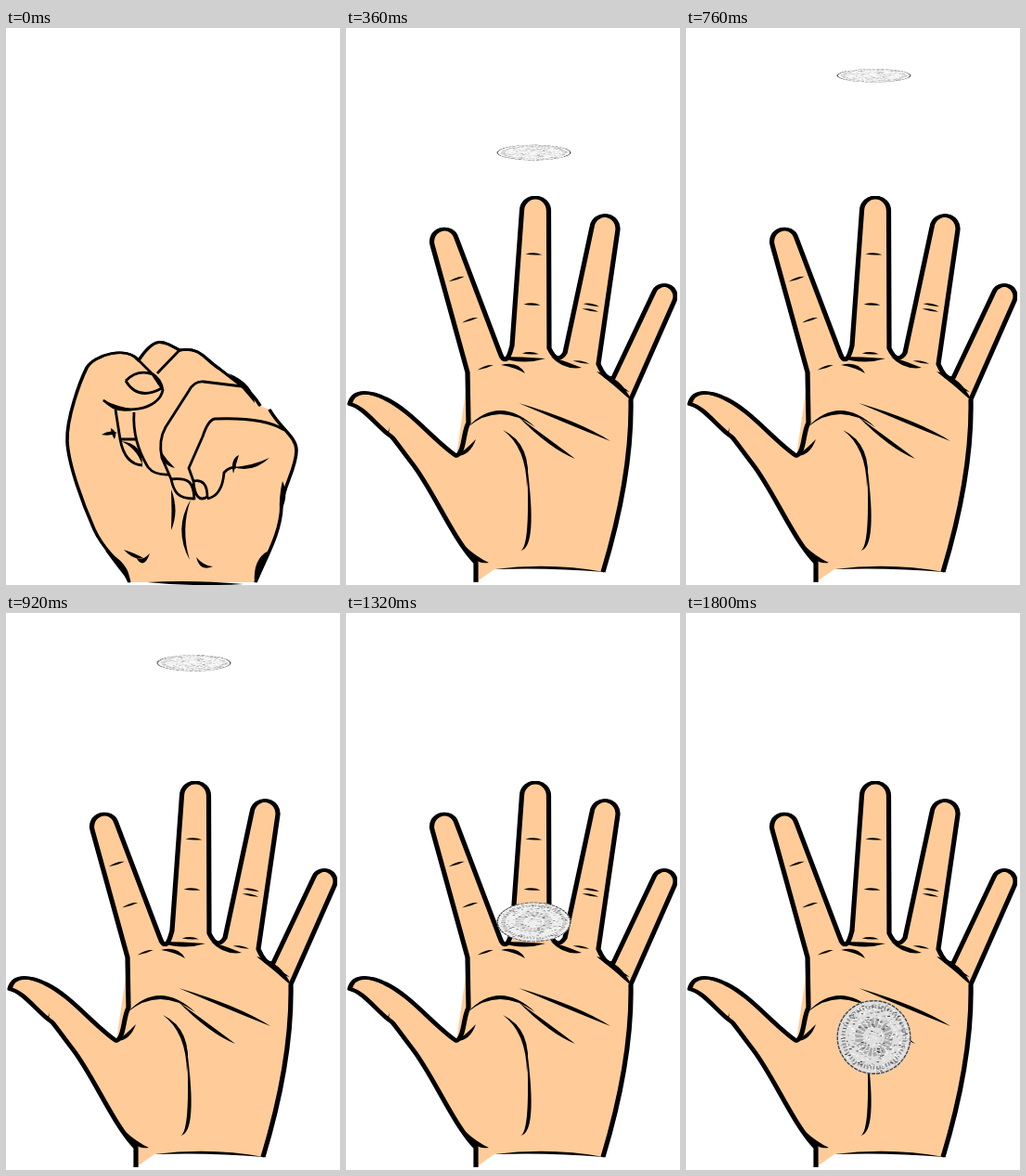
These frames come from a looping animation (360x600 px, 1.84 s). An HTML page with a canvas:

```html
<!DOCTYPE html>
<html lang="en">
<head>
<meta charset="utf-8">
<title>Coin toss</title>
<style>
  html, body { margin: 0; width: 100%; height: 100%; overflow: hidden; background: #fff; }
  canvas { display: block; }
</style>
</head>
<body>
<canvas id="stage" width="360" height="600"></canvas>
<script>
const ctx = document.getElementById('stage').getContext('2d');
const LOOP = 1840, STEP = 40, TAU = 2 * Math.PI;

// Tapered pen line: a quadratic curve that is widest in the middle.
function taper(x1, y1, cx, cy, x2, y2, width = 4) {
  const length = Math.hypot(x2 - x1, y2 - y1);
  const nx = (y1 - y2) / length * width, ny = (x2 - x1) / length * width;
  return new Path2D(`M${x1},${y1}Q${cx + nx},${cy + ny} ${x2},${y2}Q${cx - nx},${cy - ny} ${x1},${y1}`);
}

// A finger runs from its two base corners to a round tip.
const finger = (left, right, tip, radius, joints) => ({ left, right, tip, radius, joints });
const fingers = [
  finger([131, 371], [166, 350], [106, 230], 13.5, [-.04, .35, .69]),
  finger([179, 342], [219, 345], [204, 197], 14.5, [-.05, .31, .68]),
  finger([236, 350], [272, 362], [279, 216], 14, [-.03, .37, .41]),
  finger([288, 377], [307, 400], [343, 289], 12, [0])
];

function axis({ left, right, tip }) {
  const base = left.map((v, k) => (v + right[k]) / 2);
  return { base, angle: Math.atan2(tip[1] - base[1], tip[0] - base[0]) };
}

function jointCreases(f) {
  const { base, angle } = axis(f);
  const dx = -Math.sin(angle) * 9, dy = Math.cos(angle) * 9;
  return f.joints.map(s => {
    const [x, y] = base.map((v, k) => v + (f.tip[k] - v) * s);
    return taper(x - dx, y - dy, x, y - 1, x + dx, y + dy, 2.4);
  });
}

function openOutline() {
  const path = new Path2D('M140,597V576C115,550 95,500 72,470S52,442 46,438' +
    'C30,425 18,408 4,405C8,388 28,392 42,399C70,412 95,445 119,461C128,456 126,436 132,425');
  fingers.forEach((f, i) => {
    const { angle } = axis(f), next = fingers[i + 1];
    path.lineTo(...f.left);
    path.arc(...f.tip, f.radius, angle - Math.PI / 2, angle + Math.PI / 2);
    path.lineTo(...f.right);
    if (next) path.quadraticCurveTo((f.right[0] + next.left[0]) / 2, f.right[1] + 18, ...next.left);
  });
  path.addPath(new Path2D('M307,400C308,450 300,510 277,586'));
  return path;
}

const open = {
  fills: [openOutline(), new Path2D('M140,597V576L119,461L132,371L307,400C308,450 300,510 277,586Q220,578 160,583Z')],
  edge: openOutline(),
  pen: 3.6, nib: .8,
  creases: [
    ...fingers.flatMap(jointCreases),
    taper(131, 430, 165, 398, 204, 430), taper(186, 419, 222, 450, 247, 464),
    taper(169, 433, 198, 450, 195, 495), taper(195, 470, 203, 560, 188, 563),
    taper(186, 404, 250, 427, 285, 445), taper(160, 583, 220, 578, 278, 586, 3),
    taper(119, 461, 131, 458, 140, 443), taper(128, 558, 138, 574, 154, 576, 5),
    taper(167, 363, 184, 362, 193, 372), taper(36, 430, 46, 444, 47, 429, 3),
    taper(164, 354, 190, 359, 215, 356, 5), taper(221, 354, 236, 364, 254, 366, 5),
    taper(270, 370, 293, 380, 308, 402, 6)
  ]
};

const fistEdge = new Path2D('M133,597C122,570 107,567 95,540S67,470 66,445S80,380 87,366' +
  'C95,352 130,342 143,358C160,332 168,336 187,347C210,343 214,357 230,367L252,384Q265,392 274,407' +
  'M284,411C296,432 313,440 313,455C313,475 298,495 297,515C296,545 280,570 269,597');
const fistFolds = new Path2D(
  'M105,401C125,418 165,412 169,390Q167,378 157,372L143,358' +
  'M129,380Q142,367 158,373L168,388Q142,402 129,380' +
  'M187,347L163,372' +
  'M254,386L213,381Q203,380 197,391L172,430Q164,444 168,463L178,486' +
  'M300,433Q278,419 225,421Q218,422 212,440L197,474L202,488' +
  'M178,486C198,484 202,490 203,507C185,507 181,500 178,486' +
  'M202,488C212,486 217,492 217,505Q204,513 202,488' +
  'M217,507Q233,504 235,479Q240,473 248,473' +
  'M118,411L123,443Q128,470 147,471M138,414Q136,445 153,473Q160,482 176,481M122,443H140');
const fist = {
  fills: [new Path2D('M133,597C122,570 107,567 95,540S67,470 66,445S80,380 87,366' +
    'C95,352 130,342 143,358C160,332 168,336 187,347C210,343 214,357 230,367L252,384Q265,392 274,407' +
    'L284,411C296,432 313,440 313,455C313,475 298,495 297,515C296,545 280,570 269,597Z')],
  edge: fistEdge, folds: fistFolds,
  pen: 2.8, nib: .4,
  creases: [
    taper(104, 400, 118, 413, 140, 411, 5), taper(245, 473, 265, 476, 284, 463),
    taper(251, 460, 245, 466, 245, 480), taper(103, 438, 112, 436, 120, 436),
    taper(113, 431, 117, 436, 117, 443), taper(178, 497, 183, 520, 178, 541),
    taper(199, 508, 184, 540, 198, 573), taper(127, 562, 139, 570, 148, 571),
    taper(140, 570, 147, 580, 155, 566, 5), taper(205, 570, 211, 583, 223, 580),
    taper(124, 445, 144, 450, 147, 471), taper(167, 456, 170, 468, 182, 474),
    taper(240, 372, 262, 387, 268, 404, 6), taper(298, 488, 300, 505, 295, 522, 6),
    taper(107, 563, 128, 580, 134, 598, 7), taper(283, 563, 272, 575, 268, 598, 7),
    taper(152, 597, 200, 598, 256, 599)
  ]
};

function drawHand({ fills, edge, folds, pen, nib, creases }) {
  ctx.save();
  ctx.beginPath();
  ctx.rect(0, 181, 357, 419);
  ctx.clip();
  ctx.fillStyle = '#ffcc99';
  fills.forEach(f => ctx.fill(f));
  ctx.fillStyle = ctx.strokeStyle = '#000';
  ctx.lineJoin = 'round';
  ctx.lineWidth = pen;
  if (folds) ctx.stroke(folds);
  for (const shift of [-nib, 2 * nib]) {
    ctx.translate(shift, 0);
    ctx.stroke(edge);
  }
  ctx.translate(-nib, 0);
  creases.forEach(c => ctx.fill(c));
  ctx.restore();
}

// Engraving marks scattered evenly over the coin.
let seed = 7;
const random = () => (seed = seed * 16807 % 2147483647) / 2147483647;
const marks = Array.from({ length: 420 }, () => {
  const angle = random() * TAU, r = 37 * Math.sqrt(random());
  return { x: r * Math.cos(angle), y: r * Math.sin(angle), w: 1 + random() * 2, grey: random() };
});

function ring(radius, width, colour, dash) {
  ctx.setLineDash(dash);
  ctx.lineWidth = width;
  ctx.strokeStyle = colour;
  ctx.beginPath();
  ctx.arc(0, 0, radius, 0, TAU);
  ctx.stroke();
  ctx.setLineDash([]);
}

function drawCoin(y, angle) {
  const tilt = Math.cos(angle), flat = Math.abs(tilt);
  ctx.save();
  ctx.translate(202.5, y);
  ctx.scale(1, tilt);
  ctx.fillStyle = `hsl(0, 0%, ${100 - 13 * flat}%)`;
  ctx.beginPath();
  ctx.arc(0, 0, 40, 0, TAU);
  ctx.fill();
  ring(33, 4, `rgba(110, 110, 110, ${.3 + .4 * flat})`, [1.6, 1.8]);
  ring(16, 9, `rgba(120, 120, 120, ${.5 * flat})`, [3, 1.5]);
  for (const { x, y, w, grey } of marks) {
    ctx.fillStyle = grey < .5 ? '#fff' : grey < .8 ? '#aaa' : '#444';
    ctx.fillRect(x, y, w, 1);
  }
  ring(39.3, 1.4, '#444', [4, 1]);
  ctx.restore();
}

// Rise with deceleration, hover, then fall with the same acceleration.
function coinHeight(t) {
  const n = Math.max(0, 600 - t, t - 880) / STEP;
  return 50 + t / 600 + 2.32 * n * n;
}

// The flip starts face up and speeds up slightly.
function coinAngle(t) {
  const n = (t - 80) / STEP;
  return (36.3 * n + .08 * n * n - 180) * Math.PI / 180;
}

function render() {
  const t = Math.floor(performance.now() % LOOP / STEP) * STEP;
  ctx.clearRect(0, 0, 360, 600);
  if (t < 80 || (t >= 1440 && t < 1800)) {
    drawHand(fist);
  } else {
    drawHand(open);
    if (t >= 1800) drawCoin(457, 0);
    else drawCoin(coinHeight(t), coinAngle(t));
  }
  requestAnimationFrame(render);
}
render();
</script>
</body>
</html>
```
